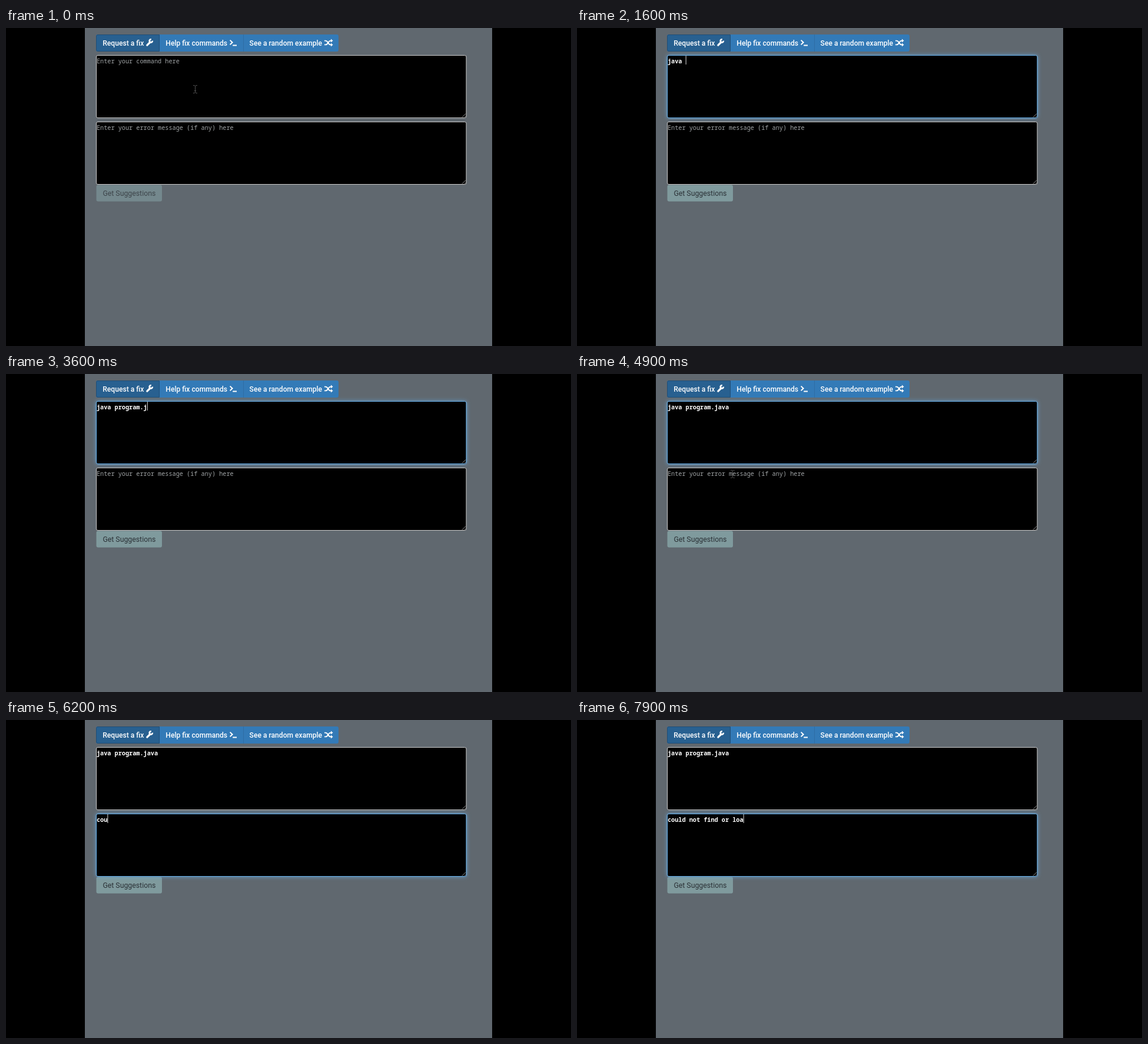
These frames come from a looping animation (960 px wide and 540 px high, 8 s). An HTML page:

```html
<!DOCTYPE html>
<html lang="en">
<head>
<meta charset="utf-8">
<title>Request a fix</title>
<style>
  html, body { margin: 0; width: 100%; height: 100%; overflow: hidden; background: #000; }
  svg { display: block; width: 960px; height: 540px; }
  text { font: 500 12.1px Roboto, sans-serif; fill: #fff; }
  .mono { font: 700 10.21px "Noto Sans Mono", monospace; }
  .hint { font-weight: 500; fill: #a0a4a6; }
  .submit { font-weight: 400; font-size: 12.3px; fill: #2b3136; }
  .box { fill: #000; stroke: #ccc; }
  .focus { stroke: #66afe9; filter: drop-shadow(0 0 3.5px rgba(102, 175, 233, .75)); }
  .icon { fill: none; stroke: #fff; }
</style>
</head>
<body>
<svg viewBox="0 0 960 540">
  <rect width="960" height="540" fill="#000"/>
  <rect x="134" width="692" height="540" fill="#60686f"/>

  <rect x="153" y="11" width="412" height="29" rx="3" fill="#337ab7"/>
  <path d="M403.5 11V40" stroke="#2e6da4"/>
  <path d="M156 11.5H260.5V39.5H156a2.5 2.5 0 0 1-2.5-2.5V14a2.5 2.5 0 0 1 2.5-2.5z" fill="#286090" stroke="#204d74"/>
  <text x="164.3" y="29.6">Request a fix</text>
  <text x="271.3" y="29.6">Help fix commands</text>
  <text x="413.6" y="29.6">See a random example</text>

  <g class="icon">
    <path d="M246.7 19.4A2.6 2.6 0 1 0 248.8 21.6" stroke-width="2.6"/>
    <path d="M239.8 29.2L245 24" stroke-width="3.2" stroke-linecap="round"/>
    <path d="M380.6 20.6L384.6 24.4L380.6 28.2M385.2 29.4H392" stroke-width="2"/>
    <path d="M541 21.6H543C547.5 21.6 547 28.4 551.5 28.4H553M541 28.4H543C547.5 28.4 547 21.6 551.5 21.6H553" stroke-width="1.9"/>
    <path d="M552 18.6L555.6 21.6L552 24.6zM552 25.4L555.6 28.4L552 31.4z" fill="#fff" stroke="none"/>
  </g>

  <g id="submit">
    <rect x="153.5" y="266.5" width="111.5" height="28" rx="3" fill="#7f9a9d"/>
    <text class="submit" x="164.4" y="285">Get Suggestions</text>
  </g>

  <g id="fields"></g>
  <rect id="caret" width="1" height="15" fill="#ddd"/>
  <path id="pointer" d="M-3.5 -6.5H-1.5L0 -5.5L1.5 -6.5H3.5M-3.5 6.5H-1.5L0 5.5L1.5 6.5H3.5M0 -5.5V5.5M-1.5 2.5H1.5" fill="none" stroke="#505050"/>
</svg>
<script>
const LOOP = 8000, CHAR = 6.126, LEFT = 154;
const byId = id => document.getElementById(id);
const clamp = v => Math.min(1, Math.max(0, v));
const ease = v => v * v * (3 - 2 * v);
const ramp = (t, from, to) => clamp((t - from) / (to - from));

function addField(y, hint) {
  const g = document.createElementNS("http://www.w3.org/2000/svg", "g");
  const rect = cls => `<rect class="box ${cls}" x="153.5" y="${y}" width="628.5" height="106" rx="2.5"/>`;
  g.innerHTML = `${rect("")}${rect("focus")}
    <path d="M775 ${y + 105}l6 -6M779 ${y + 105}l2 -2" stroke="#999"/>
    <text class="mono" x="${LEFT}" y="${y + 13.7}"></text>`;
  byId("fields").append(g);
  return { y, hint, focus: g.querySelector(".focus"), label: g.querySelector("text") };
}

// Segments [start time, first count, end time, last count] give when each key lands.
function keyTimes(...segments) {
  return segments.flatMap(([t0, n0, t1, n1]) =>
    Array.from({ length: n1 - n0 + 1 }, (_, i) => t0 + (t1 - t0) * i / (n1 - n0)));
}

const command = Object.assign(addField(46.5, "Enter your command here"), {
  text: "java program.java", keys: keyTimes([1100, 1, 1560, 5], [1820, 6, 3580, 14], [3800, 15, 4200, 17])
});
const error = Object.assign(addField(159.5, "Enter your error message (if any) here"), {
  text: "could not find or load", keys: keyTimes([5980, 1, 7960, 22].length ? [5980, 1, 6180, 3] : [], [6290, 4, 7880, 21])
});
const FOCUS = 350, SWITCH = 5200;

function showField(field, t, glow) {
  const count = field.keys.filter(k => k <= t).length;
  field.count = count;
  field.label.textContent = count ? field.text.slice(0, count) : field.hint;
  field.label.setAttribute("class", count ? "mono" : "mono hint");
  field.focus.style.opacity = glow;
}

function showCaret(t) {
  const field = t < SWITCH ? command : error;
  const start = t < SWITCH ? FOCUS : SWITCH;
  const last = Math.max(start, field.keys[field.count - 1] || 0);
  const on = t >= FOCUS && Math.floor((t - last) / 500) % 2 === 0;
  byId("caret").setAttribute("x", LEFT + field.count * CHAR);
  byId("caret").setAttribute("y", field.y + .5);
  byId("caret").style.opacity = on ? 1 : 0;
}

function showPointer(t) {
  const a = ease(ramp(t, 0, 600)), b = ease(ramp(t, 4500, 5200));
  const x = 321.5 - 65 * a + 13 * b, y = 104 - 31 * a + 159 * b;
  const visible = t < 1100 || (t >= 4500 && t < 5980);
  byId("pointer").setAttribute("transform", `translate(${x} ${y})`);
  byId("pointer").style.opacity = visible ? 1 : 0;
}

function draw(t) {
  const moved = ramp(t, SWITCH, SWITCH + 150);
  showField(command, t, ramp(t, FOCUS, FOCUS + 150) * (1 - moved));
  showField(error, t, moved);
  byId("submit").style.opacity = command.count ? 1 : .65;
  showCaret(t);
  showPointer(t);
}

const origin = performance.now();
function tick() {
  draw((performance.now() - origin) % LOOP);
  requestAnimationFrame(tick);
}
tick();
</script>
</body>
</html>
```
